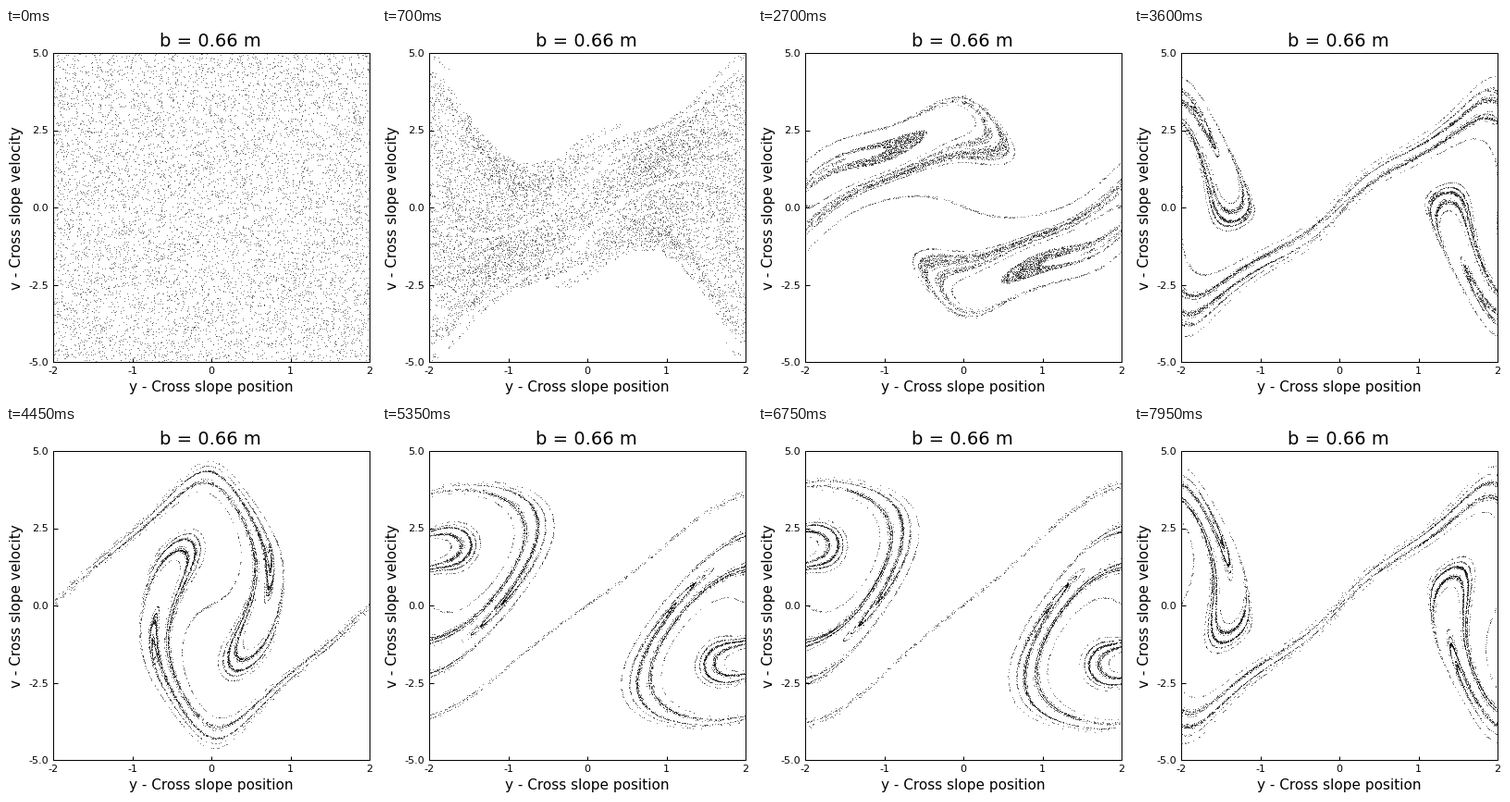
Write a matplotlib script that moves like this. It is 400 px wide and 400 px high and loops after 8000 ms.

```python
import numpy as np
import matplotlib.pyplot as plt
from matplotlib.animation import FuncAnimation

# Sled on a mogul slope: H = -a x - b cos(p x) cos(q y), constant downslope speed
A, B, C, G = 0.25, 0.66, 0.5, 9.81
P, Q = np.pi / 5, np.pi / 2
U = 3.5
STEP, SUB = 0.01, 10
FRAMES, COUNT = 160, 8000
SIZE = 400


def accel(x, y, v):
    cx, sx = np.cos(P * x), np.sin(P * x)
    cy, sy = np.cos(Q * y), np.sin(Q * y)
    hx = -A + B * P * sx * cy
    hy = B * Q * cx * sy
    hxx = B * P * P * cx * cy
    hyy = B * Q * Q * cx * cy
    hxy = -B * P * Q * sx * sy
    push = G + hxx * U * U + 2 * hxy * U * v + hyy * v * v
    return -push / (1 + hx * hx + hy * hy) * hy - C * v


def simulate():
    """Euler steps for every sled; one (y, v) state per frame."""
    rng = np.random.default_rng(4)
    y = rng.uniform(-2, 2, COUNT)
    v = rng.uniform(-5, 5, COUNT)
    states = []
    for n in range(FRAMES * SUB):
        if n % SUB == 0:
            states.append(((y + 2) % 4 - 2, v))
        y, v = y + STEP * v, v + STEP * accel(U * STEP * n, y, v)
    return states


states = simulate()

plt.rcParams["font.family"] = "DejaVu Sans"
fig = plt.figure(figsize=(SIZE / 100, SIZE / 100), dpi=100, facecolor="white")

left, right, top, bottom = 51, 393, 27, 361
ax = fig.add_axes([left / SIZE, 1 - bottom / SIZE,
                   (right - left) / SIZE, (bottom - top) / SIZE])
ax.set_xlim(-2, 2)
ax.set_ylim(-5, 5)
ax.set_xticks([])
ax.set_yticks([])
for spine in ax.spines.values():
    spine.set_linewidth(0.72)


def label(x, y, text, size, **kw):
    kw = {"ha": "center", "va": "baseline", **kw}
    fig.text(x / SIZE, 1 - y / SIZE, text, fontsize=size, color="black", **kw)


def tick(px, py, dx, dy):
    ax.plot([px, px + dx], [py, py + dy], color="black", lw=0.72,
            solid_capstyle="butt", zorder=3)


for n in range(-2, 3):
    tick(n, -5, 0, 4.5 * 10 / (bottom - top))
    label(left + (n + 2) / 4 * (right - left), 374, str(n), 8)
for n in (-5, -2.5, 0, 2.5, 5):
    tick(-2, n, 4.5 * 4 / (right - left), 0)
    label(46, bottom - (n + 5) / 10 * (bottom - top) + 4, f"{n:.1f}", 8,
          ha="right")

mid_x, mid_y = (left + right) / 2, (top + bottom) / 2
label(mid_x - 1, 19.5, f"b = {B} m", 14)
label(mid_x, 393, "y - Cross slope position", 11)
label(16, mid_y + 0.5, "v - Cross slope velocity", 11,
      rotation=90, rotation_mode="anchor")

dots, = ax.plot([], [], ",", color="black", alpha=0.5)


def draw(frame):
    dots.set_data(*states[frame])
    return dots,


anim = FuncAnimation(fig, draw, frames=FRAMES, interval=50, repeat=True,
                     repeat_delay=0, init_func=lambda: draw(0), blit=False)
plt.show()
```
